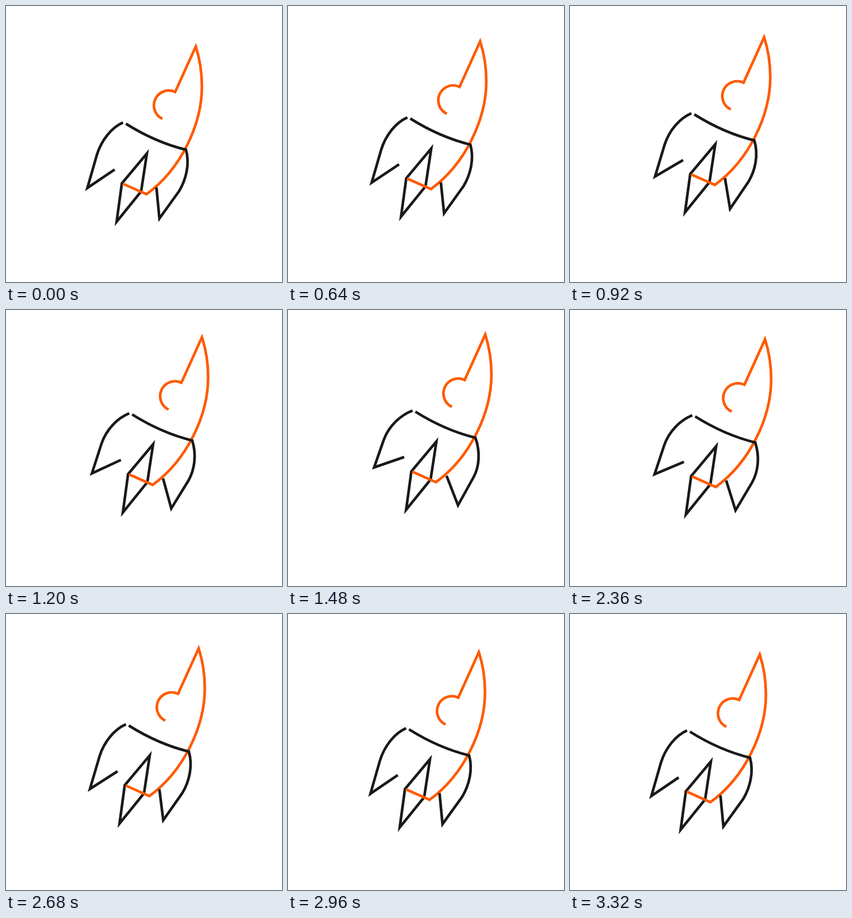
An HTML page that plays this animation: 480 by 480 pixels, repeating every 3360 ms.

```html
<!DOCTYPE html>
<html lang="en">
<head>
<meta charset="utf-8">
<title>Rocket</title>
<style>
  html, body { margin: 0; width: 100%; height: 100%; overflow: hidden; background: #fff; }
  svg { display: block; width: 100vw; height: 100vh; }
  path { fill: none; stroke: #191919; stroke-width: 4.6; stroke-miterlimit: 10; }
  .hull { stroke: #ff5a00; }
</style>
</head>
<body>
<svg viewBox="0 0 480 480">
  <g id="rocket">
    <path d="M245 256.6L201.5 308.5L192.4 375.2L235 322.5Z"/>
    <path class="hull" d="M203 309L244.3 327.3C304 284 340.7 206 340.7 140C340.7 115 337 92 330 70.5L294.2 149.5A25.5 25.5 0 0 0 272 196.2"/>
    <path id="left"/>
    <path id="right"/>
  </g>
</svg>
<script>
  const LOOP = 3360, STEP = 40;
  const $ = id => document.getElementById(id);
  const ease = x => (1 - Math.cos(Math.PI * Math.min(1, Math.max(0, x)))) / 2;

  // Rises from 0 to 1 between start and peak, then falls back until end.
  const swing = (t, start, peak, end) =>
    t < peak ? ease((t - start) / (peak - start)) : ease((end - t) / (end - peak));

  function draw(now) {
    const t = Math.floor(now % LOOP / STEP) * STEP;
    const lift = swing(t, 0, 1720, 3360);
    const flare = swing(t, 500, 1960, 2840);
    const pt = (x, y, dx, dy) => `${x + dx * flare} ${y + dy * flare} `;

    $('rocket').setAttribute('transform', `translate(${13.7 * lift} ${-29.2 * lift})`);
    $('left').setAttribute('d', 'M203.5 202.7C' + pt(184, 211, -2, 0) + pt(166, 233, -5, -5) +
      pt(158, 259, -6, -7) + 'L' + pt(141.5, 316.5, -6.3, -19.8) + 'L' + pt(189, 284.3, 0, -1));
    $('right').setAttribute('d', 'M208.5 204.7Q260 237 313 250C' + pt(320, 275, 2, 0) +
      pt(313, 302, 9, -3) + pt(301, 322, 11.5, -4.5) + 'L' + pt(266.8, 369.5, 20.9, -2.8) +
      'L' + pt(261.6, 315.5, 1.5, 1));
    requestAnimationFrame(() => draw(performance.now()));
  }
  draw(0);
</script>
</body>
</html>
```
